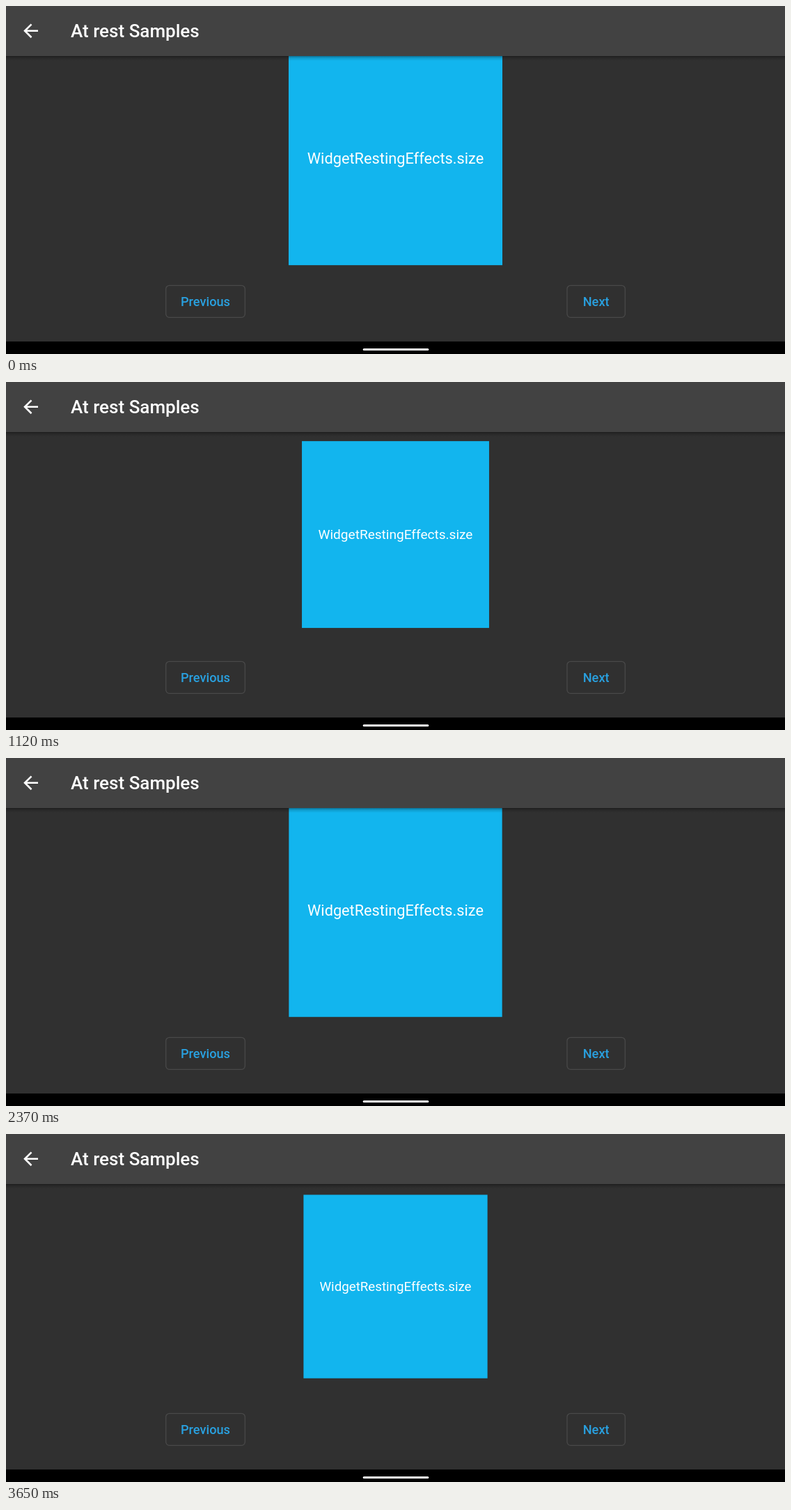
Animation, 1119 px wide and 501 px high, one loop 3690 ms. Source, as an HTML page with a canvas:

```html
<!DOCTYPE html>
<html lang="en">
<head>
<meta charset="utf-8">
<title>At rest Samples</title>
<style>
  html, body { margin: 0; width: 100%; height: 100%; overflow: hidden; background: #303030; }
  canvas { display: block; }
</style>
</head>
<body>
<canvas id="stage" width="1119" height="501"></canvas>
<script>
const ctx = document.getElementById('stage').getContext('2d');
const W = 1119, H = 501, BAR = 72;
const LOOP = 3690, PULSE = 2383;
const CX = 559.5, CY = 219.6, BASE = 293.4;
const FONT = 'Roboto, sans-serif';
const BLUE = '#12b5ee';

// Side length of the pulsing square over one pulse: [ms, px]
const KEYS = [
  [0, 307], [261, 321.5], [347, 319.3], [522, 306.5], [770, 288.7], [867, 281],
  [1060, 271.5], [1290, 264.1], [1570, 264.1], [2040, 285.8], [2170, 295.5], [PULSE, 307]
];

function key(i) {
  const n = KEYS.length - 1;
  const turn = Math.floor(i / n);
  const [t, v] = KEYS[i - turn * n];
  return [t + turn * PULSE, v];
}

function slope(i) {
  const [t0, v0] = key(i - 1), [t1, v1] = key(i), [t2, v2] = key(i + 1);
  const a = (v1 - v0) / (t1 - t0), b = (v2 - v1) / (t2 - t1);
  return a * b <= 0 ? 0 : 2 * a * b / (a + b);
}

// Monotone cubic through the keys
function sideAt(time) {
  const t = time % PULSE;
  let i = 0;
  while (key(i + 1)[0] <= t) i++;
  const [t0, v0] = key(i), [t1, v1] = key(i + 1);
  const d = t1 - t0, u = (t - t0) / d, w = 1 - u;
  return v0 * (1 + 2 * u) * w * w + v1 * u * u * (3 - 2 * u)
    + d * u * w * (slope(i) * w - slope(i + 1) * u);
}

function rect(x, y, w, h, color) {
  ctx.fillStyle = color;
  ctx.fillRect(x, y, w, h);
}

function text(str, x, y, size, weight, color, align) {
  ctx.font = `${weight} ${size}px ${FONT}`;
  ctx.textAlign = align;
  ctx.fillStyle = color;
  ctx.fillText(str, x, y);
}

function button(label, x, w) {
  ctx.strokeStyle = '#494949';
  ctx.lineWidth = 1.3;
  ctx.beginPath();
  ctx.roundRect(x, 402.3, w, 46, 5);
  ctx.stroke();
  text(label, x + w / 2, 431.6, 18.2, 500, '#29a0df', 'center');
}

function square(side) {
  const k = side / BASE;
  rect(CX - side / 2, CY - side / 2, side, side, BLUE);
  ctx.save();
  ctx.translate(CX, CY);
  ctx.scale(k, k);
  text('WidgetRestingEffects.size', 0, 7.1, 20.8, 400, '#fff', 'center');
  ctx.restore();
}

const arrow = new Path2D('M20 11H7.83l5.59-5.59L12 4l-8 8 8 8 1.41-1.41L7.83 13H20v-2z');

function appBar() {
  const shade = ctx.createLinearGradient(0, BAR, 0, BAR + 7);
  shade.addColorStop(0, 'rgba(0,0,0,.38)');
  shade.addColorStop(0.4, 'rgba(0,0,0,.14)');
  shade.addColorStop(1, 'rgba(0,0,0,0)');
  rect(0, BAR, W, 7, shade);
  rect(0, 0, W, BAR, '#424242');
  ctx.save();
  ctx.translate(20, 20.2);
  ctx.scale(1.3, 1.3);
  ctx.fillStyle = '#fff';
  ctx.fill(arrow);
  ctx.restore();
  text('At rest Samples', 93, 45.2, 26, 500, '#fff', 'left');
}

function navBar() {
  rect(0, 483, W, H - 483, '#000');
  ctx.fillStyle = '#fff';
  ctx.beginPath();
  ctx.roundRect(512.7, 493, 94.6, 3, 1.5);
  ctx.fill();
}

function draw(time) {
  rect(0, 0, W, H, '#303030');
  square(sideAt(time));
  button('Previous', 229.7, 113.6);
  button('Next', 806, 83.3);
  appBar();
  navBar();
}

const start = performance.now();
function tick() {
  draw((performance.now() - start) % LOOP);
  requestAnimationFrame(tick);
}
tick();
</script>
</body>
</html>
```
